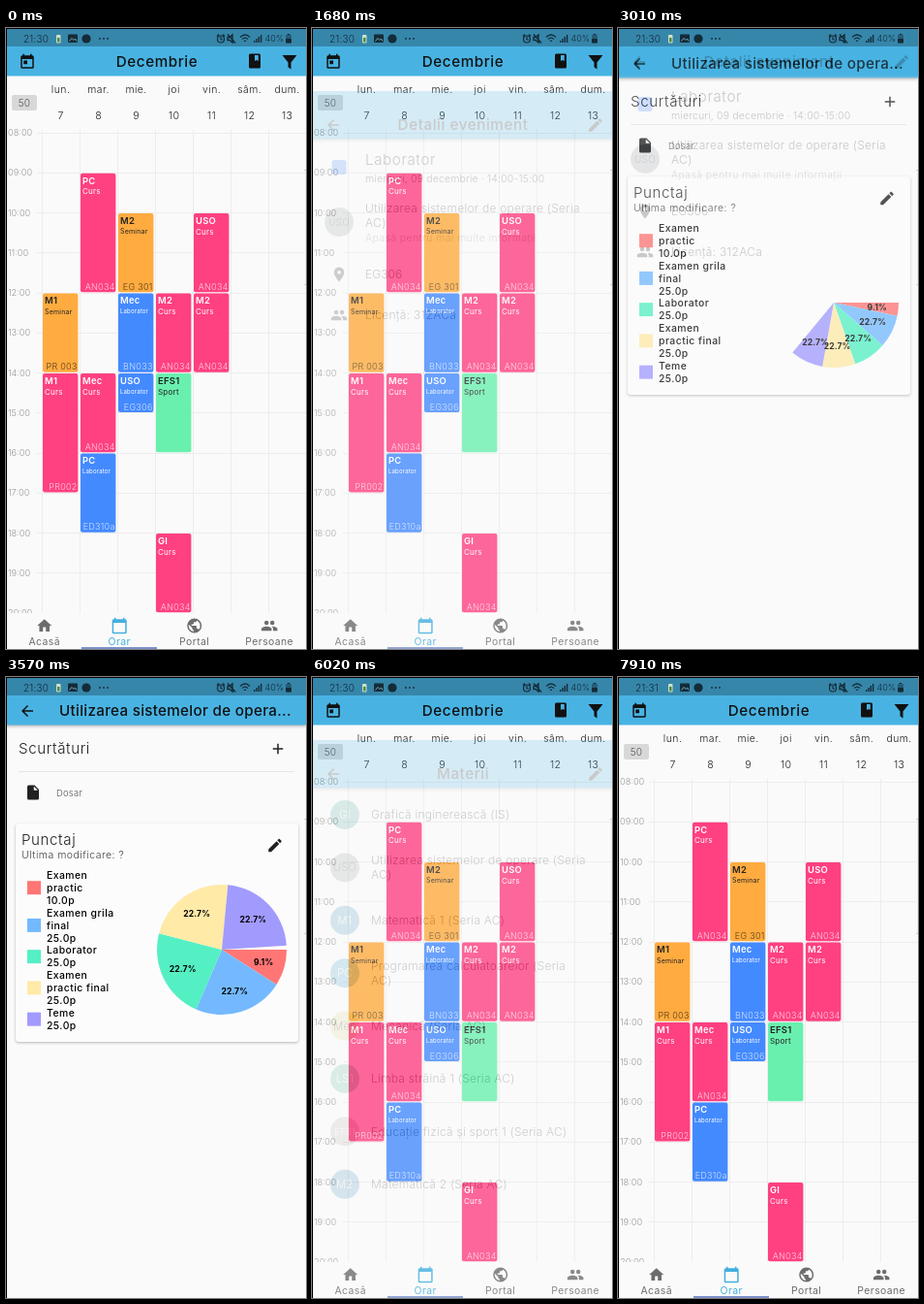
Animation, 310 px wide and 640 px high, one loop 8000 ms. Source, as an HTML page with a canvas:

```html
<!DOCTYPE html>
<html lang="ro">
<head>
<meta charset="utf-8">
<style>
  html, body { margin: 0; width: 100%; height: 100%; overflow: hidden; background: #fafafa; }
  canvas { display: block; width: 310px; height: 640px; }
</style>
</head>
<body>
<canvas id="stage" width="310" height="640"></canvas>
<script>
const W = 310, H = 640, LOOP = 8000, STEP = 70, PAGE_MS = 300;
const STATUS_H = 19, BAR_H = 49.5;
const BLUE = '#48b3e3', PAPER = '#fafafa', INK = '#212121';
const PINK = '#ff4081', ORANGE = '#ffab40', COBALT = '#448aff', MINT = '#69f0ae';

const screen = document.getElementById('stage').getContext('2d');
const layer = Object.assign(document.createElement('canvas'), { width: W, height: H });
const layerCtx = layer.getContext('2d');
let ctx = screen;

const ICONS = Object.fromEntries(Object.entries({
  back: 'M20 11H7.83l5.59-5.59L12 4l-8 8 8 8 1.41-1.41L7.83 13H20z',
  edit: 'M3 17.25V21h3.75L17.81 9.94l-3.75-3.75zM20.71 7.04c.39-.39.39-1.02 0-1.41l-2.34-2.34c-.39-.39-1.02-.39-1.41 0l-1.83 1.83 3.75 3.75z',
  add: 'M19 13h-6v6h-2v-6H5v-2h6V5h2v6h6z',
  file: 'M6 2a2 2 0 0 0-2 2v16a2 2 0 0 0 2 2h12a2 2 0 0 0 2-2V8l-6-6zM13 9V3.5L18.5 9z',
  place: 'M12 2a7 7 0 0 0-7 7c0 5.25 7 13 7 13s7-7.75 7-13a7 7 0 0 0-7-7zM12 6.5a2.5 2.5 0 0 1 0 5 2.5 2.5 0 0 1 0-5z',
  people: 'M16 11a3 3 0 1 0-3-3 3 3 0 0 0 3 3zM8 11a3 3 0 1 0-3-3 3 3 0 0 0 3 3zM8 13c-2.33 0-7 1.17-7 3.5V19h14v-2.5C15 14.17 10.33 13 8 13zM16 13l-.97.05C16.2 13.9 17 15 17 16.5V19h6v-2.5c0-2.33-4.67-3.5-7-3.5z',
  home: 'M10 20v-6h4v6h5v-8h3L12 3 2 12h3v8z',
  today: 'M19 3h-1V1h-2v2H8V1H6v2H5a2 2 0 0 0-2 2v14a2 2 0 0 0 2 2h14a2 2 0 0 0 2-2V5a2 2 0 0 0-2-2zM19 19H5V8h14zM7 10h5v5H7z',
  calendar: 'M20 3h-1V1h-2v2H7V1H5v2H4a2 2 0 0 0-2 2v16a2 2 0 0 0 2 2h16a2 2 0 0 0 2-2V5a2 2 0 0 0-2-2zM20 21H4V8h16z',
  book: 'M18 2H6a2 2 0 0 0-2 2v16a2 2 0 0 0 2 2h12a2 2 0 0 0 2-2V4a2 2 0 0 0-2-2zM12 4h5v8l-2.5-1.5L12 12z',
  filter: 'M2 2.5h20l-8 10V22l-4-3v-6.5z',
  globe: 'M12 2a10 10 0 1 0 0 20 10 10 0 0 0 0-20zM11 19.93A8 8 0 0 1 4.21 10.2L9 15v1a2 2 0 0 0 2 2zM17.9 17.4A2 2 0 0 0 16 16h-1v-3a1 1 0 0 0-1-1H8v-2h2a1 1 0 0 0 1-1V7h2a2 2 0 0 0 2-2v-.4a8 8 0 0 1 2.9 12.8z'
}).map(([name, d]) => [name, new Path2D(d)]));

function rect(x, y, w, h, color, radius = 0) {
  ctx.fillStyle = color;
  ctx.beginPath();
  ctx.roundRect(x, y, w, h, radius);
  ctx.fill();
}

function raisedRect(x, y, w, h, color, radius = 0) {
  ctx.save();
  ctx.shadowColor = 'rgba(0,0,0,.28)';
  ctx.shadowBlur = 3;
  ctx.shadowOffsetY = 1;
  rect(x, y, w, h, color, radius);
  ctx.restore();
}

function disc(x, y, r, color) {
  ctx.fillStyle = color;
  ctx.beginPath();
  ctx.arc(x, y, r, 0, Math.PI * 2);
  ctx.fill();
}

function stroke(path, color, width = 1) {
  ctx.strokeStyle = color;
  ctx.lineWidth = width;
  ctx.stroke(new Path2D(path));
}

// y is the middle of the capital letters
function text(str, x, y, size, { color = INK, weight = 350, align = 'left', track = .03 } = {}) {
  ctx.font = `${weight} ${size}px Inter, sans-serif`;
  ctx.letterSpacing = `${size * track}px`;
  ctx.textAlign = align;
  ctx.fillStyle = color;
  ctx.fillText(str, x, y + size * .36);
}

function icon(name, x, y, size = 18, color = INK) {
  ctx.save();
  ctx.translate(x - size / 2, y - size / 2);
  ctx.scale(size / 24, size / 24);
  ctx.fillStyle = color;
  ctx.fill(ICONS[name], 'evenodd');
  ctx.restore();
}

function page(title, left, right) {
  rect(0, 0, W, H, PAPER);
  const bar = left === 'back' ? raisedRect : rect;
  bar(0, 0, W, BAR_H, BLUE);
  icon(left, 22, 35, 18, '#111');
  if (right) icon(right, 293, 35, 18, '#111');
  if (title) text(title, 156, 35, 15.2, { color: '#111', weight: 450, align: 'center', track: .038 });
}

// column, first hour, last hour, colour, subject, kind, room
const EVENTS = [
  [1, 9, 12, PINK, 'PC', 'Curs', 'AN034'],
  [2, 10, 12, ORANGE, 'M2', 'Seminar', 'EG 301'],
  [4, 10, 12, PINK, 'USO', 'Curs', 'AN034'],
  [0, 12, 14, ORANGE, 'M1', 'Seminar', 'PR 003'],
  [2, 12, 14, COBALT, 'Mec', 'Laborator', 'BN033'],
  [3, 12, 14, PINK, 'M2', 'Curs', 'AN034'],
  [4, 12, 14, PINK, 'M2', 'Curs', 'AN034'],
  [0, 14, 17, PINK, 'M1', 'Curs', 'PR002'],
  [1, 14, 16, PINK, 'Mec', 'Curs', 'AN034'],
  [2, 14, 15, COBALT, 'USO', 'Laborator', 'EG306'],
  [3, 14, 16, MINT, 'EFS1', 'Sport', ''],
  [1, 16, 18, COBALT, 'PC', 'Laborator', 'ED310a'],
  [3, 18, 20, PINK, 'GI', 'Curs', 'AN034']
];
const colX = c => 38 + 39 * c;
const hourY = h => 107.7 + 41.25 * (h - 8);

function drawEvent([col, from, to, color, name, kind, room]) {
  const x = colX(col), y = hourY(from) + .7, end = hourY(to) - .4;
  const dark = color === ORANGE || color === MINT;
  const ink = dark ? '#222' : '#fff';
  const kindSize = { Laborator: 6, Seminar: 7 }[kind] || 8;
  rect(x, y, 36.4, end - y, color, 2);
  text(name, x + 2, y + 7.6, 9.4, { color: ink, weight: 600 });
  text(kind, x + 2, y + 18.9, kindSize, { color: ink, weight: 400 });
  text(room, x + 35.6, end - 5.6, 9, { color: dark ? 'rgba(0,0,0,.65)' : 'rgba(255,255,255,.75)', weight: 300, align: 'right' });
}

function calendar() {
  page('Decembrie', 'today', 'filter');
  icon('book', 257, 34, 18, '#111');
  ['lun.', 'mar.', 'mie.', 'joi', 'vin.', 'sâm.', 'dum.'].forEach((day, i) => {
    const x = colX(i) + 18.6;
    text(day, x, 63, 10.4, { align: 'center', track: .045 });
    text(String(7 + i), x, 90, 10.6, { align: 'center' });
    rect(colX(i) - 1, 105, 1, 498, '#ededed');
  });
  rect(6, 69, 26, 16, '#d8d8d8', 2);
  text('50', 19, 77, 10, { color: '#555', align: 'center' });
  for (let h = 8; h <= 20; h++) {
    const y = hourY(h);
    rect(32, Math.round(y), W - 32, 1, '#ededed');
    text(String(h).padStart(2, '0') + ':00', 2, y, 9.2, { color: '#999', weight: 300, track: 0 });
  }
  EVENTS.forEach(drawEvent);

  rect(0, 603, W, 37, PAPER);
  [['home', 'Acasă'], ['calendar', 'Orar'], ['globe', 'Portal'], ['people', 'Persoane']].forEach(([name, label], i) => {
    const x = 39.7 + 77.5 * i, color = i === 1 ? '#42afe0' : '#6c6c6c';
    icon(name, x, 616, 18, color);
    text(label, x, 632, 10.4, { color, weight: 400, align: 'center', track: .04 });
  });
  rect(78, 638, 78, 2, '#7b91c9');
}

function details() {
  page('Detalii eveniment', 'back', 'edit');
  rect(20.5, 71, 15, 15, COBALT, 3);
  text('Laborator', 55, 71, 15.1, { track: .042 });
  text('miercuri, 09 decembrie · 14:00-15:00', 55, 90, 10.5, { track: .014 });
  disc(28, 135, 15, '#9ea4a6');
  text('USO', 28, 135, 10, { color: '#333', align: 'center' });
  text('Utilizarea sistemelor de operare (Seria', 55, 121, 12, { track: .02 });
  text('AC)', 55, 136, 12);
  text('Apasă pentru mai multe informații', 55, 151, 10.5, { color: '#808080', weight: 300, track: .038 });
  icon('place', 28, 189);
  text('EG306', 55, 189, 12, { track: .005 });
  icon('people', 28, 231);
  text('Licență: 312ACa', 55, 231, 12, { track: .025 });
}

const SCORES = [
  { lines: ['Examen', 'practic', '10.0p'], points: 10, color: '#ff7675' },
  { lines: ['Examen grila', 'final', '25.0p'], points: 25, color: '#74b9ff' },
  { lines: ['Laborator', '25.0p'], points: 25, color: '#55efc4' },
  { lines: ['Examen', 'practic final', '25.0p'], points: 25, color: '#ffeaa7' },
  { lines: ['Teme', '25.0p'], points: 25, color: '#a29bfe' }
];

function pie(cx, cy, r, progress) {
  const total = SCORES.reduce((sum, s) => sum + s.points, 0);
  let angle = 0;
  const labels = SCORES.map(({ points, color }) => {
    const share = points / total, sweep = share * Math.PI * 2 * progress;
    ctx.fillStyle = color;
    ctx.beginPath();
    ctx.moveTo(cx, cy);
    ctx.arc(cx, cy, r, angle, angle + sweep);
    ctx.fill();
    const mid = angle + sweep / 2;
    angle += sweep;
    return [(share * 100).toFixed(1) + '%', cx + Math.cos(mid) * r * .67, cy + Math.sin(mid) * r * .67];
  });
  labels.forEach(([str, x, y]) => text(str, x, y, 8.6, { color: '#000', weight: 700, align: 'center', track: .01 }));
}

function subject(t) {
  page('', 'back');
  text('Utilizarea sistemelor de opera...', 55, 35, 15.2, { color: '#111', weight: 450, track: .02 });
  text('Scurtături', 13, 74, 15.1, { track: .04 });
  icon('add', 281, 74);
  rect(13, 97, 285, 1, '#e6e6e6');
  icon('file', 28, 119);
  text('Dosar', 52, 119.5, 9.4, { color: '#555' });

  raisedRect(10, 151, 292, 225, '#fcfcfc', 3);
  text('Punctaj', 16, 167.5, 15.1, { track: .04 });
  text('Ultima modificare: ?', 16, 183, 10.5, { color: '#444', weight: 300, track: .045 });
  icon('edit', 278, 173.5);

  let row = 0;
  SCORES.forEach(({ lines, color }) => {
    const top = 204.3 + row * 12.9;
    rect(22, top + (lines.length - 1) * 6.45 - 7, 14, 14, color);
    lines.forEach((line, i) => text(line, 42, top + i * 12.9, 10.4, { color: '#000', weight: 500, track: .045 }));
    row += lines.length;
  });
  const p = Math.min(1, Math.max(0, (t - 2850) / 800));
  pie(223, 281, 67, 1 - (1 - p) ** 2);
}

const SUBJECTS = [
  ['GI', '#58ada0', 'Grafică inginerească (IS)'],
  ['USO', '#9ea4a6', 'Utilizarea sistemelor de operare (Seria', 'AC)'],
  ['M1', '#4a98bd', 'Matematică 1 (Seria AC)'],
  ['PC', '#4ba3c6', 'Programarea calculatoarelor (Seria', 'AC)'],
  ['Mec', '#dcd892', 'Mecanică (Seria AC)'],
  ['LS1', '#5cbb9b', 'Limba străină 1 (Seria AC)'],
  ['EFS1', '#bcaeae', 'Educație fizică și sport 1 (Seria AC)'],
  ['M2', '#4893bf', 'Matematică 2 (Seria AC)']
];

function subjects() {
  page('Materii', 'back', 'edit');
  SUBJECTS.forEach(([code, color, ...lines], i) => {
    const y = 77 + 54.4 * i;
    const ink = code === 'USO' || code === 'Mec' ? '#333' : '#fff';
    disc(34, y, 15, color);
    text(code, 34, y, code.length > 3 ? 9.5 : 11, { color: ink, align: 'center' });
    lines.forEach((line, k) => text(line, 61, y + (k - (lines.length - 1) / 2) * 15, 12, { track: .02 }));
  });
}

function statusBar(t) {
  const ink = '#142b38';
  rect(0, 0, W, STATUS_H, 'rgba(0,0,0,.25)');
  text(t < 7280 ? '21:30' : '21:31', 18, 11, 10, { color: ink, track: .02 });
  rect(52, 7, 4.5, 8.5, '#cfe0c8', 1);
  rect(53, 10, 2.5, 4.5, '#4d8a48');
  rect(64, 6.5, 10, 8.5, ink, 1);
  stroke('M65.5 13.5l2.5-3 2 2 1.5-1.5 1.5 2.5', '#78a6bb');
  disc(83, 11, 4.6, ink);
  for (let i = 0; i < 3; i++) disc(97 + i * 4, 11, .9, ink);
  stroke('M218.5 11.5a3.5 3.5 0 1 0 7 0a3.5 3.5 0 1 0-7 0M222 9v3h2M218 8.5l2-2M226 8.5l-2-2', ink, 1.2);
  stroke('M229 9.5h2l3-2.5v8l-3-2.5h-2zM229 6.5l8 9', ink, 1.4);
  stroke('M242 9.5q5-5 10 0M244 11.7q3-3 6 0M246 13.7q1-1 2 0', ink, 1.2);
  for (let i = 0; i < 4; i++) rect(256 + i * 2.3, 13 - i * 2, 1.4, 2 + i * 2, ink);
  text('40%', 267.5, 11, 9, { color: ink, track: 0 });
  rect(289, 7, 6, 8.5, 'rgba(20,43,56,.45)', 1);
  rect(289, 11, 6, 4.5, ink, 1);
  rect(290.7, 6, 2.6, 1, ink);
}

function bezier(x1, y1, x2, y2) {
  const at = (a, b, s) => 3 * a * s * (1 - s) ** 2 + 3 * b * s * s * (1 - s) + s ** 3;
  return x => {
    let lo = 0, hi = 1;
    for (let i = 0; i < 24; i++) {
      const mid = (lo + hi) / 2;
      if (at(x1, x2, mid) < x) lo = mid; else hi = mid;
    }
    return at(y1, y2, (lo + hi) / 2);
  };
}
const slideCurve = bezier(.4, 0, .2, 1), fadeCurve = bezier(.42, 0, 1, 1);

const VISITS = [
  { draw: details, open: 1563, close: 5005 },
  { draw: subject, open: 2755, close: 4100 },
  { draw: subjects, open: 5903, close: 7730, closeMs: 175 }
];

function overlay({ draw, open, close, closeMs = PAGE_MS }, t) {
  const v = Math.min(1, (t - open) / PAGE_MS, 1 - (t - close) / closeMs);
  if (v <= 0) return;
  ctx = layerCtx;
  draw(t);
  ctx = screen;
  ctx.globalAlpha = fadeCurve(v);
  ctx.drawImage(layer, 0, Math.round(H / 4 * (1 - slideCurve(v))));
  ctx.globalAlpha = 1;
}

function frame(now) {
  const t = Math.floor(now % LOOP / STEP) * STEP;
  calendar();
  VISITS.forEach(visit => overlay(visit, t));
  statusBar(t);
  rect(309, 147, 1, 118, '#efefef');
  rect(308, 146, 2, 1, '#cfcfcf');
  rect(308, 264, 2, 1, '#cfcfcf');
  rect(0, 0, 1, H, '#000');
  rect(0, 0, W, 1, '#000');
  requestAnimationFrame(frame);
}
requestAnimationFrame(frame);
</script>
</body>
</html>
```
